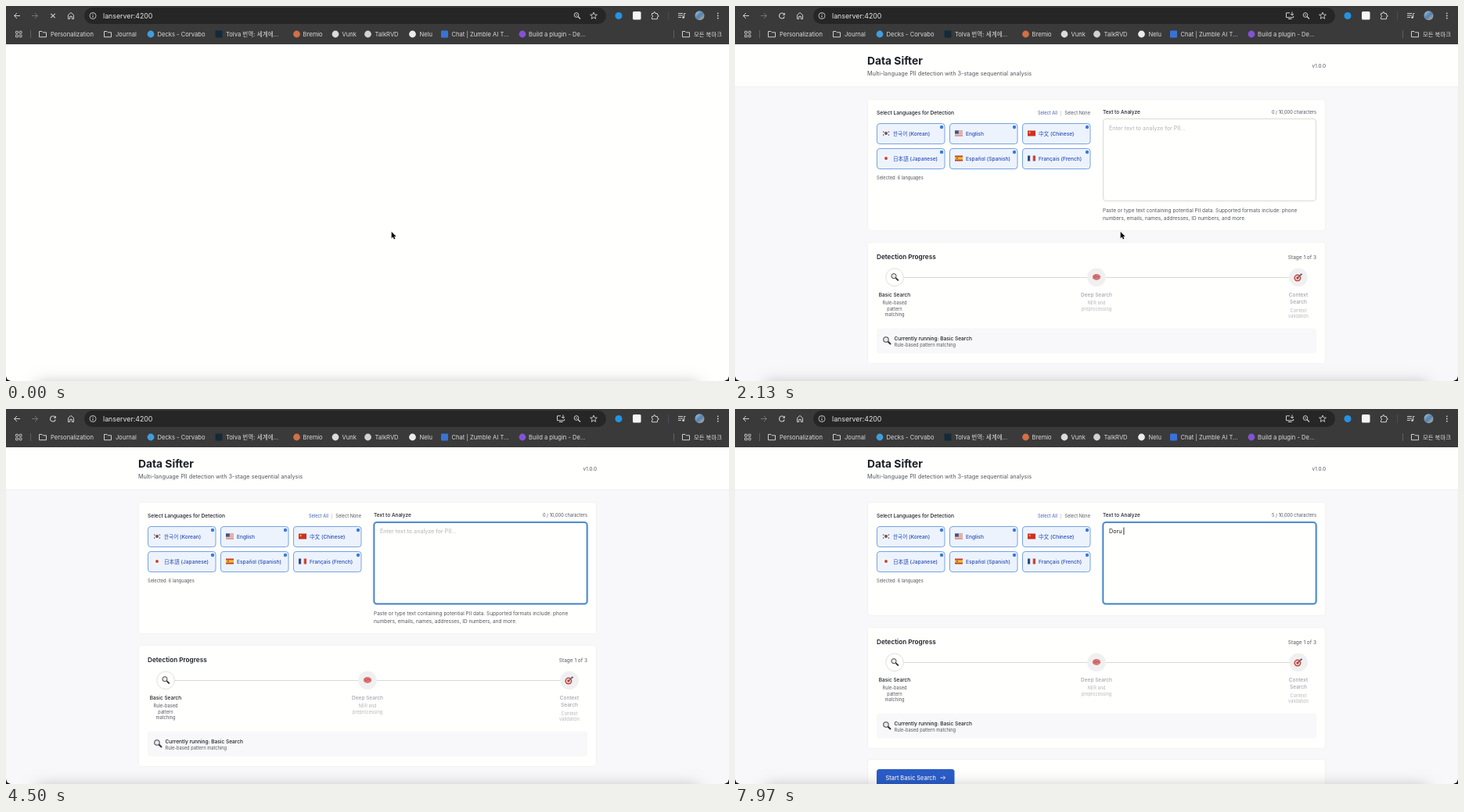
Recreate the animation shown at these times as an HTML page with a canvas. Size 924x480 px, loop 8 s.

```html
<!DOCTYPE html>
<html lang="en">
<head>
<meta charset="utf-8">
<title>Data Sifter</title>
<style>
html, body { margin: 0; width: 100%; height: 100%; overflow: hidden; background: #fffffd; }
canvas { display: block; width: 924px; height: 480px; }
</style>
</head>
<body>
<canvas id="stage"></canvas>
<script>
const W = 924, H = 480, LOOP = 8000;
const canvas = document.getElementById('stage');
const ctx = canvas.getContext('2d');
const ratio = window.devicePixelRatio || 1;
canvas.width = Math.round(W * ratio);
canvas.height = Math.round(H * ratio);

const FONT = 'Inter, "Noto Sans CJK KR", "Noto Sans CJK JP", "Noto Sans CJK", sans-serif';
const INK = '#1b1f27', GREY = '#53565f', MUTED = '#a3a5b0', BLUE = '#2a4cb4';
const WHITE = '#fffffd', PAGE = '#f8f8fa';
const BAR = '#3a3a3a', PILL = '#262626', ICON = '#cfcfcf', BAR_TEXT = '#dadada';

// Moments of the story in ms
const PAGE_SHOWN = 280, LOADED = 1000;
const MOVE_START = 2350, MOVE_END = 2800, FOCUS = 2900, POINTER_GONE = 4130;
const TYPED = 'Doru ', KEYS = [5800, 6000, 6200, 6650, 6900];

function rect(x, y, w, h, fill) {
  ctx.fillStyle = fill;
  ctx.fillRect(x, y, w, h);
}

function box(x, y, w, h, r, fill, stroke, width = 1) {
  ctx.beginPath();
  ctx.roundRect(x, y, w, h, r);
  if (fill) { ctx.fillStyle = fill; ctx.fill(); }
  if (stroke) { ctx.strokeStyle = stroke; ctx.lineWidth = width; ctx.stroke(); }
}

function disc(x, y, r, fill, stroke, width = 1) {
  ctx.beginPath();
  ctx.arc(x, y, r, 0, Math.PI * 2);
  if (fill) { ctx.fillStyle = fill; ctx.fill(); }
  if (stroke) { ctx.strokeStyle = stroke; ctx.lineWidth = width; ctx.stroke(); }
}

function line(points, color, width = 1, close = false) {
  ctx.beginPath();
  for (let i = 0; i < points.length; i += 2) ctx.lineTo(points[i], points[i + 1]);
  if (close) ctx.closePath();
  ctx.strokeStyle = color;
  ctx.lineWidth = width;
  ctx.stroke();
}

function shape(points, fill) {
  ctx.beginPath();
  for (let i = 0; i < points.length; i += 2) ctx.lineTo(points[i], points[i + 1]);
  ctx.closePath();
  ctx.fillStyle = fill;
  ctx.fill();
}

// y is the middle of the capital letters
function text(str, x, y, size, color, weight = 400, align = 'left') {
  ctx.font = `${weight} ${size}px ${FONT}`;
  ctx.textAlign = align;
  ctx.fillStyle = color;
  ctx.fillText(str, x, y + size * 0.36);
}

function at(x, y, draw) {
  ctx.save();
  ctx.translate(x, y);
  draw();
  ctx.restore();
}

function star(x, y, r, inner) {
  const pts = [];
  for (let i = 0; i < 10; i++) {
    const a = i * Math.PI / 5 - Math.PI / 2, d = i % 2 ? inner : r;
    pts.push(x + Math.cos(a) * d, y + Math.sin(a) * d);
  }
  return pts;
}

function folder(x, y) {
  line([x - 4.5, y - 3.5, x - 1, y - 3.5, x + .3, y - 2.2, x + 4.5, y - 2.2,
        x + 4.5, y + 3.7, x - 4.5, y + 3.7], ICON, 1, true);
}

function reloadIcon(loading) {
  at(60, 12.5, () => {
    if (loading) {
      line([-2.7, -2.7, 2.7, 2.7], ICON, 1.1);
      line([2.7, -2.7, -2.7, 2.7], ICON, 1.1);
      return;
    }
    ctx.beginPath();
    ctx.arc(0, 0, 3.4, .3, Math.PI * 1.78);
    ctx.strokeStyle = ICON;
    ctx.lineWidth = 1.1;
    ctx.stroke();
    shape([3.9, -4, 3.9, -.7, .7, -.7], ICON);
  });
}

function toolbar(loading) {
  rect(0, 0, W, 49, BAR);
  box(100, 2, 667, 21, 10.5, PILL);

  line([18, 12.5, 10.5, 12.5], ICON);
  line([14, 9, 10.5, 12.5, 14, 16], ICON);
  line([33, 12.5, 40.5, 12.5], '#757575');
  line([37, 9, 40.5, 12.5, 37, 16], '#757575');
  reloadIcon(loading);
  line([79.5, 11.5, 83, 8.5, 86.5, 11.5, 86.5, 16.5, 84.4, 16.5, 84.4, 13.3,
        81.6, 13.3, 81.6, 16.5, 79.5, 16.5], ICON, 1, true);

  disc(111, 12.5, 4, null, ICON, .9);
  rect(110.5, 12, 1, 2.7, ICON);
  rect(110.5, 10, 1, 1, ICON);
  text('lanserver:4200', 124, 12.5, 8.8, '#e6e6e6');

  if (!loading) {
    line([709, 8.8, 704.5, 8.8, 704.5, 14.7, 713.7, 14.7, 713.7, 12.8], ICON);
    line([707, 16.5, 711.5, 16.5], ICON);
    line([712, 7.5, 712, 11.8], ICON);
    line([710, 10, 712, 12, 714, 10], ICON);
  }
  disc(729, 11.5, 2.8, null, ICON, 1);
  line([731, 13.5, 734, 16.5], ICON, 1.2);
  line([727.8, 11.5, 730.2, 11.5], ICON, .8);
  line(star(751, 12.6, 4.6, 2), ICON, .9, true);

  disc(783, 12.5, 4.5, '#2493e3');
  box(801, 7, 10.5, 10.5, 1.5, '#f6f6f6');
  line([825.5, 9.5, 827.6, 9.5, 828, 7.8, 829.4, 7.8, 829.8, 9.5, 832.5, 9.5,
        832.5, 11.5, 834, 12, 834, 13.4, 832.5, 13.9, 832.5, 16.7, 825.5, 16.7,
        825.5, 14.4, 827, 13.2, 825.5, 12], ICON, 1, true);
  rect(846, 7, 1, 11, '#4d4a58');
  for (let i = 0; i < 3; i++) rect(859, 9 + i * 2.5, i < 2 ? 6 : 4, 1, ICON);
  line([868.5, 9.5, 866.7, 9.5, 866.7, 14.5], ICON);
  disc(865.6, 14.7, 1.4, ICON);
  const photo = ctx.createLinearGradient(881, 7, 891, 18);
  photo.addColorStop(0, '#a8c5d8');
  photo.addColorStop(.5, '#5381b0');
  photo.addColorStop(1, '#b5b09c');
  disc(886.5, 12.3, 6, photo);
  for (let i = -1; i < 2; i++) disc(909.8, 12.5 + i * 3.2, .9, ICON);
}

function bookmarks() {
  for (let i = 0; i < 4; i++) {
    box(12.5 + (i % 2) * 4.7, 32.3 + (i >> 1) * 4.7, 2.8, 2.8, .3, null, ICON, .9);
  }
  rect(31, 31, 1, 10, '#606060');
  rect(853, 31, 1, 10, '#606060');
  [47, 130, 869].forEach(x => folder(x, 36));
  [[185, '#3e9fdd'], [371.5, '#d26f45'], [421, '#dcdcdc'], [462.5, '#d2d2d2'],
   [519.5, '#ececec'], [660, '#8253d6']].forEach(([x, c]) => disc(x, 36, 4.4, c));
  box(267.5, 31.5, 9, 9, 1, '#152a38');
  box(556, 31.5, 9, 9, 1, '#3973d8');
  [[57, 'Personalization'], [140, 'Journal'], [193.5, 'Decks - Corvabo'],
   [281, 'Tolva 번역: 세계에...'], [379.5, 'Bremio'], [429.5, 'Vunk'],
   [471.5, 'TalkRVD'], [528.5, 'Nelu'], [569.5, 'Chat | Zumble AI T...'],
   [668, 'Build a plugin - De...']].forEach(([x, s]) => text(s, x, 36, 7.6, BAR_TEXT));
  text('모든 북마크', 915, 36, 7.4, BAR_TEXT, 400, 'right');
}

const FLAGS = [
  () => {
    rect(0, 0, 10, 7, '#f3f3f0');
    disc(5, 3.5, 1.9, '#315798');
    ctx.beginPath();
    ctx.arc(5, 3.5, 1.9, Math.PI, 0);
    ctx.fillStyle = '#c73a40';
    ctx.fill();
    [[1, 1], [7.8, 1], [1, 5], [7.8, 5]].forEach(([x, y]) => rect(x, y, 1.3, 1.2, '#3b3b3b'));
  },
  () => {
    for (let i = 0; i < 7; i++) rect(0, i, 10, 1, i % 2 ? '#f5e8e4' : '#cb5147');
    rect(0, 0, 4.8, 4, '#3f5588');
  },
  () => { rect(0, 0, 10, 7, '#cc3025'); shape(star(2.6, 2.6, 1.7, .7), '#f1cf3b'); },
  () => { rect(0, 0, 10, 7, '#f5f5f3'); disc(5, 3.5, 1.9, '#c93b35'); },
  () => {
    rect(0, 0, 10, 7, '#c33c2c');
    rect(0, 1.8, 10, 3.4, '#eebd35');
    rect(2, 2.5, 1.8, 1.8, '#a65b38');
  },
  () => {
    rect(0, 0, 3.4, 7, '#304a87');
    rect(3.4, 0, 3.3, 7, '#f3f3f0');
    rect(6.7, 0, 3.3, 7, '#cb443c');
  }
];
const LANGS = ['한국어 (Korean)', 'English', '中文 (Chinese)',
               '日本語 (Japanese)', 'Español (Spanish)', 'Français (French)'];

function card(y, h) {
  box(169.5, y + .5, 585, h, 3.5, WHITE, '#f3f3f3');
}

function languages() {
  text('Select Languages for Detection', 181, 137, 6.6, INK, 500);
  text('Select All', 412, 137.3, 5.7, '#3d5cae', 400, 'right');
  rect(416, 134, .8, 7, '#d0d0d0');
  text('Select None', 454, 137.3, 5.7, GREY, 400, 'right');
  LANGS.forEach((name, i) => {
    const x = 181 + (i % 3) * 93, y = 150 + Math.floor(i / 3) * 32;
    box(x + .5, y + .5, 86.5, 26, 3.5, '#ecf3fd', '#76a3e2');
    disc(x + 83, y + 5, 2.2, '#3b7ae0');
    at(x + 7, y + 9.5, FLAGS[i]);
    text(name, x + 21, y + 13.3, 6.6, BLUE, 500);
  });
  text('Selected: 6 languages', 181, 220, 5.7, GREY);
}

function editor(t, count) {
  const focused = t >= FOCUS;
  text('Text to Analyze', 470, 136, 6.5, INK, 500);
  text(`${count} / 10,000 characters`, 743, 136, 5.7, GREY, 400, 'right');
  if (focused) {
    box(469.5, 144.2, 274, 106, 4.5, null, '#a9cbea', 1.5);
    box(470.5, 145.2, 272, 104, 3.5, WHITE, '#3a7cc6', 1.5);
  } else {
    box(470.5, 144.5, 272, 105, 3.5, WHITE, '#dadad6');
  }
  const typed = TYPED.slice(0, count);
  if (count) text(typed, 478, 156.3, 7.2, INK);
  else text('Enter text to analyze for PII...', 478, 156.3, 7.2, '#b2b3b6');
  if (focused) {
    const since = t - (count ? KEYS[count - 1] : FOCUS);
    if (since % 1000 < 500) {
      ctx.font = `400 7.2px ${FONT}`;
      rect(478 + ctx.measureText(typed).width, 151.5, .9, 9.5, INK);
    }
  }
  if (!count) {
    text('Paste or type text containing potential PII data. Supported formats include: phone', 470, 261.7, 6.47, GREY);
    text('numbers, emails, names, addresses, ID numbers, and more.', 470, 271.3, 6.47, GREY);
  }
}

function lens(x, y, s) {
  at(x, y, () => {
    ctx.scale(s, s);
    line([1.4, 1.4, 4.8, 4.8], '#33302e', 1.8);
    disc(-1, -1, 3.1, '#e4ebee', '#4a4a4a', 1);
  });
}

function brain(x, y) {
  ctx.beginPath();
  ctx.ellipse(x, y, 5.2, 3.9, 0, 0, Math.PI * 2);
  ctx.fillStyle = '#dc7676';
  ctx.fill();
  line([x - 3.5, y - .5, x - 1, y + .7, x + .5, y - 1, x + 3.5, y + .3], '#a84a4c', .8);
  line([x - 1, y - 3, x - 2, y - 1.5], '#a84a4c', .8);
}

function bullseye(x, y) {
  disc(x - .6, y + .6, 4.5, '#c4453d');
  disc(x - .6, y + .6, 3, '#f1ddd6');
  disc(x - .6, y + .6, 1.7, '#c4453d');
  line([x - .6, y + .6, x + 4.5, y - 4.5], '#4c5158', 1.2);
  shape([x + 3, y - 5, x + 6, y - 4.5, x + 4, y - 2.3], '#596470');
}

function step(x, lines, sub, active) {
  lines.forEach((s, i) => text(s, x, 369.3 + i * 9.7, 6.5, active ? INK : MUTED, 500, 'center'));
  const top = 380 + (lines.length - 1) * 9.7;
  sub.forEach((s, i) => text(s, x, top + i * 7.6, 5.7, active ? GREY : '#b6b7bf', 400, 'center'));
}

function progress() {
  card(302, 155);
  text('Detection Progress', 181, 321.2, 8.2, INK, 600);
  text('Stage 1 of 3', 743, 321.2, 6.5, GREY, 400, 'right');
  rect(204, 347, 516, 1, '#d8d8d4');
  disc(204, 347.3, 11.3, WHITE, '#dfdfdc');
  disc(462, 347.3, 11.8, '#f0f0f1');
  disc(720, 347.3, 11.8, '#f0f0f1');
  lens(204, 346.7, 1);
  brain(462, 347);
  bullseye(719.5, 347.5);
  step(204, ['Basic Search'], ['Rule-based', 'pattern', 'matching'], true);
  step(462, ['Deep Search'], ['NER and', 'preprocessing'], false);
  step(720, ['Context', 'Search'], ['Context', 'validation'], false);
  box(181, 412.5, 562, 32, 3.5, PAGE);
  lens(194, 428, 1.05);
  text('Currently running: Basic Search', 203.5, 425.3, 6.55, INK, 500);
  text('Rule-based pattern matching', 203.5, 433.8, 5.72, GREY);
}

function page(t) {
  const count = KEYS.filter(k => t >= k).length;
  const lift = count ? 23 : 0;
  rect(0, 49, W, 431, PAGE);
  rect(0, 49, W, 54, WHITE);
  rect(0, 103, W, 1, '#f0f0f1');
  text('Data Sifter', 169, 70.5, 13.8, INK, 700);
  text('Multi-language PII detection with 3-stage sequential analysis', 169, 86, 7.3, GREY);
  text('v1.0.0', 755, 76.7, 6.4, GREY, 400, 'right');
  card(119, 168 - lift);
  languages();
  editor(t, count);
  at(0, -lift, progress);
  if (count) {
    card(448, 60);
    box(181, 461, 99.5, 23, 3.5, '#2a5cc8');
    text('Start Basic Search', 192.5, 472, 7.35, '#f3f5fa', 500);
    line([262.5, 472, 268.5, 472], '#f3f5fa', .9);
    line([266.2, 469.6, 268.6, 472, 266.2, 474.4], '#f3f5fa', .9);
  }
}

// Soft shadow rising from below the window, and its rounded corners
function bottomEdge() {
  ctx.save();
  ctx.shadowColor = 'rgba(0,0,0,.24)';
  ctx.shadowBlur = 18 * ratio;
  rect(40, H + 2, W - 80, 30, '#000');
  ctx.restore();
  shape([0, 474, 1.6, 478, 6, H, 0, H], '#151515');
  shape([W, 474, W - 1.6, 478, W - 6, H, W, H], '#151515');
}

function pointer(t) {
  if (t >= POINTER_GONE) return;
  const p = Math.min(1, Math.max(0, (t - MOVE_START) / (MOVE_END - MOVE_START)));
  const e = p * p * (3 - 2 * p);
  const x = 492.7 + 29.3 * e, y = 289 - 122.5 * e;
  at(x, y, () => {
    if (y < 250) {
      line([-2, -4.5, 0, -3.7, 2, -4.5], INK, 1);
      line([0, -4, 0, 4], INK, 1);
      line([-2, 4.5, 0, 3.7, 2, 4.5], INK, 1);
      line([-1, 1.2, 1, 1.2], INK, .8);
    } else {
      const arrow = [0, 0, 0, 8.3, 1.9, 6.6, 3.2, 9.5, 4.7, 8.8, 3.4, 6, 5.9, 5.9];
      line(arrow, '#f2f2f2', 1.6, true);
      shape(arrow, '#0b0b0b');
    }
  });
}

function draw(t) {
  ctx.setTransform(ratio, 0, 0, ratio, 0, 0);
  rect(0, 0, W, H, WHITE);
  if (t >= PAGE_SHOWN) page(t);
  toolbar(t < LOADED);
  bookmarks();
  bottomEdge();
  pointer(t);
}

const start = performance.now();
function frame() {
  draw((performance.now() - start) % LOOP);
  requestAnimationFrame(frame);
}
frame();
</script>
</body>
</html>
```
